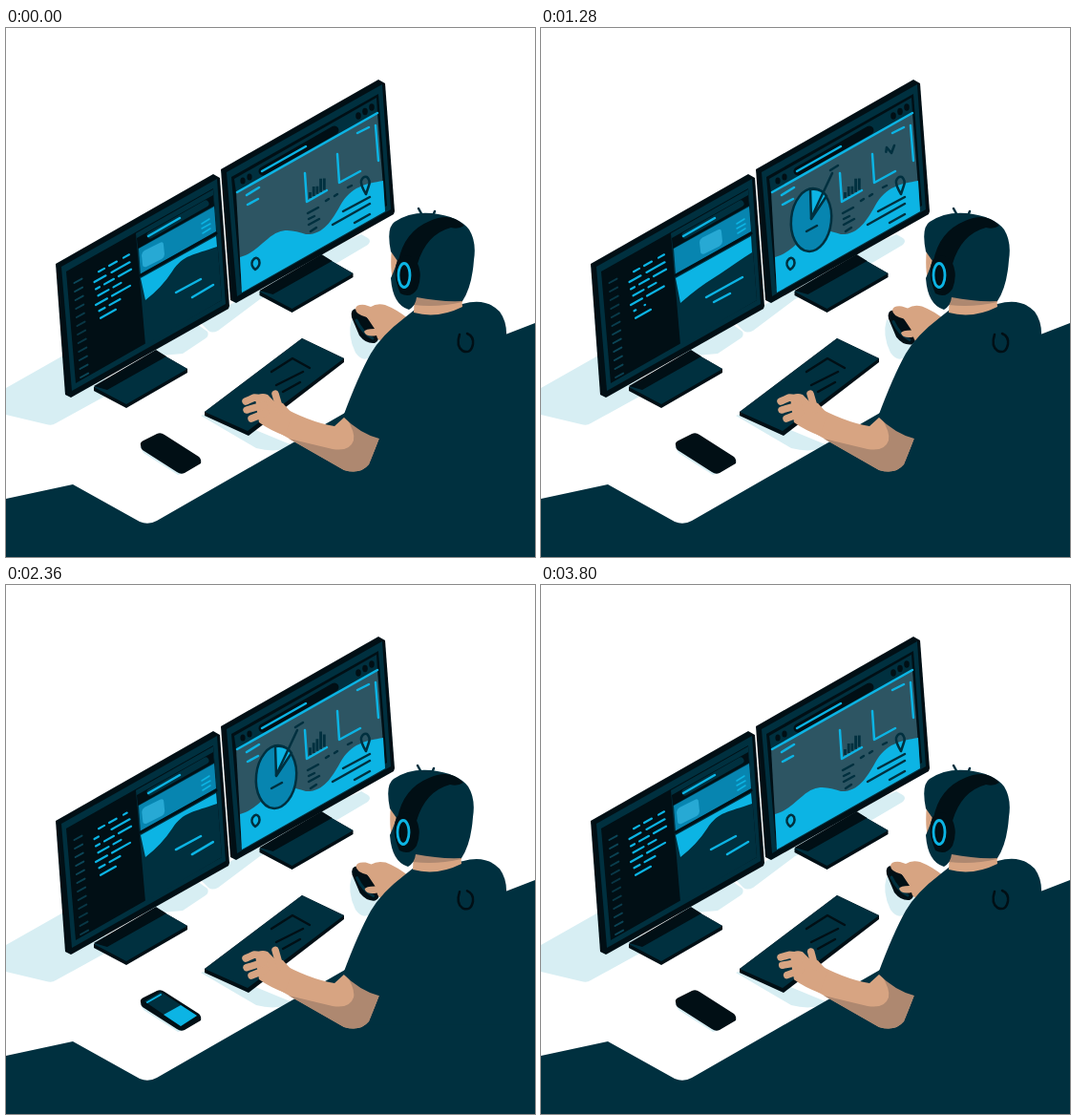
Animation of 554x554 px, one loop 3.84 s. Source, as an HTML page:

```html
<!DOCTYPE html>
<html lang="en">
<head>
<meta charset="utf-8">
<title>Developer at work</title>
<style>
  html, body { margin: 0; width: 100%; height: 100%; overflow: hidden; background: #fff; }
  svg { display: block; width: 554px; height: 554px; }
  .navy { fill: #00303f; }
  .black { fill: #010f15; }
  .cyan { fill: #0cb4e4; }
  .pale { fill: #d7eef3; }
  .skin { fill: #d7a482; }
  .shade { fill: #ae8870; }
  .line { fill: none; stroke: #00303f; stroke-width: 2.5; stroke-linecap: round; stroke-linejoin: round; }
  .ink { stroke: #010f15; }
  .glow { stroke: #0cb4e4; }
  .finger { fill: none; stroke: #d7a482; stroke-width: 7.5; stroke-linecap: round; stroke-linejoin: round; }
</style>
</head>
<body>
<svg viewBox="0 0 554 554">
  <!-- desk and floor -->
  <g class="pale">
    <path d="M0 377L60 343L112 372V381L52 414Q48 417 42 415L0 405Z"/>
    <path d="M140 345L200 310L211 318Q213 322 209 325L185 341Z"/>
    <path d="M204 309L234 290L345 228L372 216L379 220Q383 223 379 227L340 250L266 284L222 317Q216 320 212 317Z"/>
    <path d="M204 406L215 402L300 437Q285 446 262 440Z"/>
    <path d="M362 305Q357 322 366 340Q374 351 382 344L394 329Z"/>
    <path d="M140 438L144 445L180 468L186 466Z"/>
  </g>
  <path class="navy" d="M0 493L70 478L140 517Q149 521 158 516L355 403L440 350L523 321L554 309V554H0Z"/>

  <!-- stands -->
  <g id="stand">
    <path class="black" d="M92 376L157 338L190 357V361L126 398L92 380Z"/>
    <path class="navy" d="M92 376L157 338L190 357L126 394Z"/>
    <path class="black" d="M92 375L157 337L168 344L106 379Z"/>
  </g>
  <use href="#stand" x="173.500" y="-100"/>

  <!-- monitor bodies -->
  <g id="monitor">
    <path class="black" d="M52 247L217 153L224 157L234 291L233 294L68 387L62 384Z"/>
    <path class="navy" d="M58 250L221 158L230 289L69 380Z"/>
    <path class="black" d="M63 255L217 168L226 285L73 372Z"/>
  </g>
  <use href="#monitor" x="173" y="-99"/>

  <!-- left screen: editor and web page -->
  <g id="numbers"></g>
  <g id="code"></g>
  <path class="navy" d="M136 215L217 169L226 285L146 332Z"/>
  <path class="black" d="M137 220L217 175L218 186L138 231Z"/>
  <path class="line" d="M151 217L209 184" style="stroke-width:7"/>
  <path class="line glow" d="M149 218L182 199"/>
  <path d="M139 231L218 187L220 213L141 258Z" fill="#0785b0"/>
  <path id="card" fill="#27a9d4" d="M142 238Q142 235 145 233L161 225Q165 223 165 227L166 237Q166 240 163 242L147 250Q143 251 143 247Z"/>
  <path class="line glow" d="M205 205L213 200M205 210L214 205M206 215L214 210" style="stroke-width:1.500"/>
  <path class="line ink" d="M141 259L220 215" style="stroke-width:3"/>
  <path id="hill" class="cyan"/>
  <path id="copy" class="line glow"/>

  <!-- right screen: dashboard -->
  <path class="navy" d="M239 158L388 73L389 89L241 172Z"/>
  <path class="line ink" d="M269 150L344 107" style="stroke-width:9"/>
  <path class="line glow" d="M268 150L314 124"/>
  <g class="black">
    <ellipse cx="248" cy="160" rx="2.600" ry="3.500"/><ellipse cx="255" cy="156" rx="2.600" ry="3.500"/>
    <ellipse cx="369" cy="92" rx="2.800" ry="3.700"/><ellipse cx="376" cy="87.500" rx="2.800" ry="3.700"/><ellipse cx="383" cy="83" rx="2.800" ry="3.700"/>
  </g>
  <path fill="#2d5563" d="M241 172L389 89L397 192L247 277Z"/>
  <path class="cyan" d="M245 240C257 237 264 229 274 221C290 207 301 213 314 216C332 217 341 202 350 186C361 166 377 163 395 160L397 192L247 277Z"/>
  <path class="line glow" d="M242 172L389 89M252 175L265 167M253 185L264 179M368 110L380 104M387 102L390 139M313 152L315 182L336 170M347 132L349 162L371 150"/>
  <path class="line" d="M316 194L327 188M317 200L323 197M317 206L328 200M319 213L325 209M335 181L338 179M344 176L347 174M358 167L362 165"/>
  <path class="line" d="M342 206L381 184M353 192L381 177M365 204L381 195"/>
  <path class="line" d="M377 174Q371 164 372 160Q374 155 378 156Q382 160 380 165ZM261 253Q256 249 258 244Q262 238 265 243Q267 249 261 253Z"/>
  <path id="bars" class="line" style="stroke-width:2.800;stroke-linecap:butt"/>
  <path id="trend" class="line" d="M354 148L358 154L362 125L367 131L370 123"/>
  <g id="pie">
    <ellipse class="line" rx="21" ry="33" transform="rotate(6)" style="fill:#0785b0"/>
    <path class="line" d="M0 -1L-1 -32Q10 -34 16 -25Z" style="fill:#0cb4e4"/>
    <path class="line" d="M-5 12L6 6"/>
  </g>
  <path id="pointer" class="line" d="M283 199L305 152"/>
  <path id="label" class="line" d="M303 149L311 144"/>

  <!-- phone -->
  <g id="phone">
    <path class="black" d="M141 437Q140 434 144 432L158 425Q162 423 166 426L202 449Q205 452 204 456L187 466Q183 468 179 465L143 442Q141 440 141 437Z"/>
    <g id="display">
      <path class="navy" d="M145 436L162 426L200 451L183 462Z"/>
      <path class="cyan" d="M165 450L183 440L200 451L183 462Z"/>
      <path class="line glow" d="M148 437L162 429" style="stroke-width:2"/>
    </g>
  </g>

  <!-- keyboard -->
  <path class="black" d="M208 402L310 325L354 346V350L254 427L208 406Z"/>
  <path class="navy" d="M208 402L310 325L354 346L253 422Z"/>
  <path class="line ink" d="M278 360L300 346L318 356M283 374L311 360M290 381L308 371"/>

  <!-- typing arm -->
  <path class="skin" d="M284 394Q318 413 344 417L355 407L391 430L380 457Q371 468 354 463L286 424Z"/>
  <path class="shade" d="M391 430L380 457Q371 468 354 463L296 430L342 441Q360 444 364 432Q366 423 356 408Z"/>
  <g id="hand">
    <path class="skin" d="M261 387Q266 381 274 384L281 391L290 393L300 404L292 427Q276 421 265 413L263 402Z"/>
    <path id="fingers" class="finger"/>
  </g>

  <!-- mouse arm -->
  <g id="mouse">
    <path class="black" d="M362 303Q360 293 369 294L389 314Q393 327 386 330Q377 331 370 322Z"/>
    <path class="line" d="M367 306Q373 319 384 325" style="stroke-width:3"/>
    <path class="skin" d="M366 294Q367 289 376 290L382 292Q388 288 397 290Q410 295 422 305L396 328Q389 328 388 322Q377 324 375 318Q376 315 386 315L378 303Q366 300 366 294Z"/>
  </g>

  <!-- torso and head -->
  <path id="torso" class="navy" d="M353 407Q369 364 382 341Q393 322 418 303L428 295L478 289Q503 282 517 297Q525 308 524 324V460H380L391 430Q371 425 353 407Z"/>
  <path id="hood" class="line ink" d="M475 321Q471 333 478 338Q487 342 489 331Q490 323 483 320"/>
  <g id="head">
    <path class="skin" d="M404 231Q402 249 405 265L428 280L427 298Q452 305 478 292L477 280L440 240Z"/>
    <path class="shade" d="M428 281Q452 287 478 283V287Q452 293 427 290Z"/>
    <path class="navy" d="M403 234Q398 209 407 203Q423 192 446 194Q474 197 485 211Q493 224 490 243Q488 271 478 286Q455 287 430 282Q429 291 422 295Q405 290 403 262Q407 253 410 244Z"/>
    <path class="line" d="M432 189L437 198M449 192L446 199M480 218L487 219"/>
    <path class="black" d="M411 244Q417 213 444 202Q466 192 480 207Q474 211 466 209Q440 216 431 247Z"/>
    <path class="black" d="M410 243Q420 233 430 244Q437 258 431 273Q424 284 413 278Q404 258 410 243Z"/>
    <ellipse class="line glow" cx="417" cy="259" rx="6" ry="12.500" style="stroke-width:2.800"/>
  </g>
</svg>
<script>
const LOOP = 3840, HALF = LOOP / 2, SLOPE = -0.56;
const el = id => document.getElementById(id);
const clamp = v => Math.max(0, Math.min(1, v));
const mix = (a, b, k) => a + (b - a) * k;
const shift = (id, x, y) => el(id).setAttribute('transform', `translate(${x} ${y})`);
const draw = (id, d) => el(id).setAttribute('d', d);

// Eased interpolation through time, value pairs
function keys(t, ...list) {
  for (let i = 2; i < list.length; i += 2) {
    if (t < list[i]) {
      const u = clamp((t - list[i - 2]) / (list[i] - list[i - 2]));
      return mix(list[i - 1], list[i + 1], u * u * (3 - 2 * u));
    }
  }
  return list[list.length - 1];
}

// Interpolates every number between two paths of equal structure
function morph(a, b, k) {
  const ends = b.match(/[\d.]+/g);
  let i = 0;
  return a.replace(/[\d.]+/g, n => mix(+n, +ends[i++], k).toFixed(2));
}

// Shows only the part of a stroke between two lengths
function trim(path, from, to) {
  path.style.strokeDasharray = `${Math.max(0, to - from)} 999`;
  path.style.strokeDashoffset = -from;
  path.style.opacity = to - from > 0.1 ? 1 : 0;
}

function makeLine(parent, cls, width) {
  const path = document.createElementNS('http://www.w3.org/2000/svg', 'path');
  path.setAttribute('class', cls);
  path.style.strokeWidth = width;
  el(parent).append(path);
  return path;
}
const dash = (x, y, length) => `M${x} ${y}l${length} ${length * SLOPE}`;

const numbers = Array.from({ length: 12 }, (_, i) => {
  const path = makeLine('numbers', 'line', 2);
  path.style.stroke = '#0c4759';
  path.setAttribute('d', dash(71.5 + i * 0.6, 267 + i * 9, 8));
  return path;
});

const rows = ['5-11 16-24 31-37', '0-12 18-37', '1-5 10-20 25-38', '3-14 19-27', '0-12 17-36', '3-9 14-25', '4-20'];
const code = rows.flatMap((row, i) => row.split(' ').map(part => {
  const [from, to] = part.split('-').map(Number);
  return {
    path: makeLine('code', 'line glow', 2.2), length: to - from, start: 150 + i * 210 + from * 5,
    x: 92 + i * 0.5 + from, y: 258 + i * 8 + from * SLOPE
  };
}));

const trend = el('trend'), pointer = el('pointer');
const trendLength = trend.getTotalLength(), pointerLength = pointer.getTotalLength();

function render(t) {
  const p = t % HALF;

  numbers.forEach((path, i) => path.style.opacity = 0.85 + 0.15 * Math.cos(2 * Math.PI * (p / HALF - i / 12)));
  for (const { path, length, start, x, y } of code) {
    const size = p < start ? length : length * clamp((p - start) / 220);
    path.setAttribute('d', dash(x, y, size));
    path.style.opacity = size > 0.5 ? 1 : 0;
  }

  const slide = keys(p, 420, 0, 780, 1, 1280, 1, 1480, 0);
  shift('card', 24 * slide, -13.5 * slide);
  draw('hill', morph('M141 262L220 218L221 229C196 238 186 237 174 255Q163 272 146 285Z',
    'M141 262L220 218L221 235C207 244 196 252 182 261Q164 272 146 288Z', slide));
  draw('copy', morph('M178 277L204 263M195 282L217 269', 'M173 282L211 261M181 287L198 278', slide));

  let bars = '';
  for (let i = 0; i < 5; i++) {
    const x = 318.5 + i * 3.7, base = 178 - i * 2.1;
    const grow = keys(t, 0, 0, 280, 1, 600, 0, 1600, 0, 1900, 1, 2300, 0.6, 2800, 0.2, 3000, 0);
    bars += `M${x} ${base}v${-(6 + [0, 4, 2, 8, 6][i] + grow * [3, 1, 8, 7, 2][i])}`;
  }
  draw('bars', bars);

  const head = clamp((p - 680) / 335);
  const tail = 1 - (1 - clamp((p - 860) / 900)) ** 1.45;
  trim(trend, tail * trendLength, head * trendLength);

  const pie = keys(t, 240, 0, 560, 1, 3240, 1, 3560, 0);
  el('pie').setAttribute('transform', `translate(283 201) scale(${pie})`);
  trim(pointer, 0, pointerLength * keys(t, 480, 0, 760, 1, 3060, 1, 3300, 0));
  el('label').style.opacity = keys(t, 680, 0, 800, 1, 3000, 1, 3120, 0);

  el('display').style.opacity = keys(t, 1540, 0, 1700, 1, 3480, 1, 3640, 0);
  shift('phone', t > 1480 && t < 1800 ? Math.sin(t * Math.PI / 60) * 0.7 : 0, 0);

  const beat = Math.sin(2 * Math.PI * t / 320);
  const lift = Math.max(0, -beat), press = Math.max(0, beat);
  draw('fingers', `M272 388L260 387L251 ${391 - 2 * lift}M270 395L${252 + lift} ${400 - 3 * lift + press}` +
    `M272 403L${257 + lift} ${409 - lift}M287 400L${282 + lift} ${383 + lift - press}`);
  shift('hand', 0, 0.4 * lift);

  shift('mouse', keys(t, 0, 0, 400, 0, 840, 4, 1000, 4, 1280, 2, 1900, 0.5, 2300, 0.5, 2720, 2, 2840, 2, 3300, -0.5, 3800, 0),
    keys(t, 400, 0, 840, 1, 1280, 1.5, 1900, 0.5, 2300, 0.5, 2720, 1.5, 2840, 1.5, 3300, 0));
  shift('head', keys(t, 0, 0, 500, -1, 1000, -1, 1300, 0, 1700, -1, 3400, -1, 3700, 0), 0);
  const breath = keys(t, 0, 0, 700, 0.5, 1300, 0, 2000, 0.5, 2800, 0);
  shift('torso', 0, breath);
  shift('hood', 0, breath);
}

function frame() {
  render(performance.now() % LOOP);
  requestAnimationFrame(frame);
}
frame();
</script>
</body>
</html>
```
